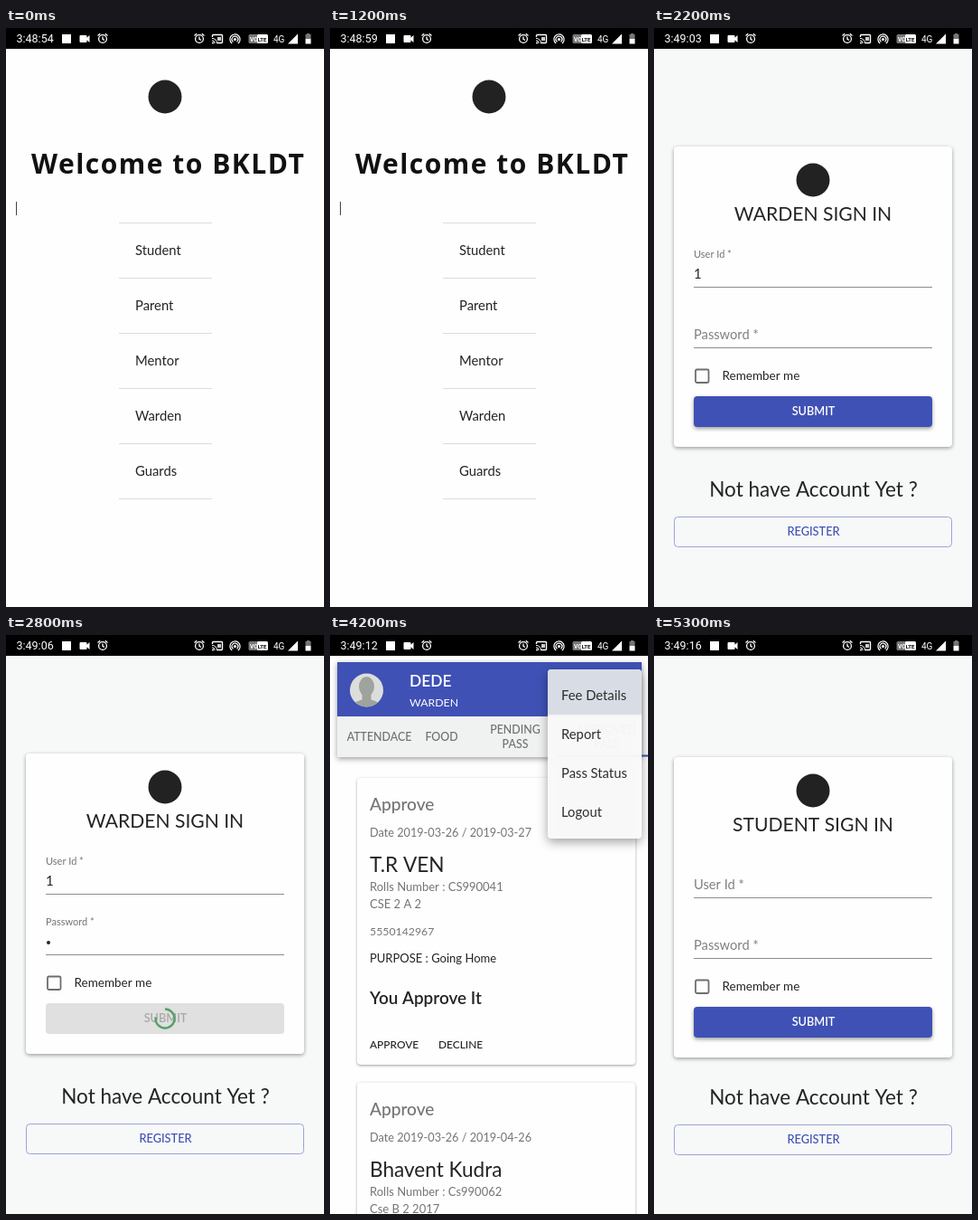
Recreate the animation shown at these times as an HTML page with a canvas. Size 352 by 640 pixels, loop 5400 ms.

```html
<!DOCTYPE html>
<html lang="en">
<head>
<meta charset="utf-8">
<title>Campus pass app</title>
<style>
html, body { margin: 0; width: 100%; height: 100%; overflow: hidden; background: #fdfdfd; }
canvas { display: block; width: 352px; height: 640px; }
</style>
</head>
<body>
<canvas id="stage" width="352" height="640"></canvas>
<script>
const ctx = document.getElementById('stage').getContext('2d');
const LOOP = 5400, STEP = 100;
const BLUE = '#3f51b5', GRAY = '#757575', INK = '#242424', PAPER = '#fdfefd';
const RED = '#bd3b33', ORANGE = '#e28423';
const PITCH = 355, REST = 184.6;

const clamp = v => Math.max(0, Math.min(1, v));
const easeOut = v => 1 - (1 - clamp(v)) ** 3;
const lerp = (a, b, p) => a + (b - a) * p;

function text(str, x, y, size, { color = INK, weight = 400, align = 'left', family = 'Lato', spacing = 0 } = {}) {
  ctx.font = `${weight} ${size}px ${family}, sans-serif`;
  ctx.letterSpacing = spacing + 'px';
  ctx.textAlign = align;
  ctx.fillStyle = color;
  ctx.fillText(str, x, y);
}

function rect(x, y, w, h, color) {
  ctx.fillStyle = color;
  ctx.fillRect(x, y, w, h);
}

function circle(x, y, r, color) {
  ctx.beginPath();
  ctx.arc(x, y, r, 0, Math.PI * 2);
  ctx.fillStyle = color;
  ctx.fill();
}

function arc(x, y, r, from, to, color, width) {
  ctx.beginPath();
  ctx.arc(x, y, r, from, to);
  ctx.strokeStyle = color;
  ctx.lineWidth = width;
  ctx.stroke();
}

function poly(color, ...points) {
  ctx.beginPath();
  points.forEach(([x, y]) => ctx.lineTo(x, y));
  ctx.closePath();
  ctx.fillStyle = color;
  ctx.fill();
}

function box(x, y, w, h, r, fill, stroke, lineWidth = 1) {
  ctx.beginPath();
  ctx.roundRect(x, y, w, h, r);
  if (fill) { ctx.fillStyle = fill; ctx.fill(); }
  if (stroke) { ctx.strokeStyle = stroke; ctx.lineWidth = lineWidth; ctx.stroke(); }
}

function raised(x, y, w, h, r, fill, blur = 4, drop = 1.5) {
  ctx.save();
  ctx.shadowColor = 'rgba(0,0,0,.38)';
  ctx.shadowBlur = blur;
  ctx.shadowOffsetY = drop;
  box(x, y, w, h, r, fill);
  ctx.restore();
}

function alarm(x) {
  arc(x, 12, 4.4, 0, Math.PI * 2, '#fff', 1.3);
  ctx.beginPath();
  ctx.moveTo(x, 9.5); ctx.lineTo(x, 12.3); ctx.lineTo(x + 2, 13.5);
  ctx.moveTo(x - 5.5, 8.5); ctx.lineTo(x - 2.8, 6.2);
  ctx.moveTo(x + 5.5, 8.5); ctx.lineTo(x + 2.8, 6.2);
  ctx.stroke();
}

function statusBar(t) {
  rect(0, 0, 352, 23, '#000');
  const secs = 54 + Math.floor(t * 0.00419 + 0.5);
  const clock = `3:${48 + Math.floor(secs / 60)}:${String(secs % 60).padStart(2, '0')}`;
  const font = { color: '#fff', family: 'Roboto' };
  text(clock, 11.5, 16.3, 12.5, font);
  rect(62, 7, 10, 10, '#fff');
  box(81.5, 8, 8, 8, 1, '#fff');
  poly('#fff', [89, 11], [92.5, 8], [92.5, 16], [89, 13]);
  alarm(107);
  alarm(214);
  // cast
  box(228.5, 7.5, 11, 9, 1, null, '#fff', 1.4);
  rect(227, 10, 6, 8, '#000');
  rect(234, 10, 4, 4, '#ccc');
  circle(229, 16.5, 1, '#fff');
  arc(228, 17, 3.2, -Math.PI / 2, 0, '#fff', 1);
  arc(228, 17, 5.6, -Math.PI / 2, 0, '#fff', 1);
  // hotspot
  circle(253.5, 12.5, 1.6, '#fff');
  for (const r of [3.4, 5.6]) arc(253.5, 12.5, r, Math.PI * 0.7, Math.PI * 2.3, '#fff', 1.2);
  box(268.5, 7, 21, 10, 1.5, '#777');
  box(278, 7, 12, 10, 1.5, '#fff');
  text('VO', 270, 14.7, 6.5, { ...font, weight: 700 });
  text('LTE', 278.7, 14.7, 6, { ...font, color: '#000', weight: 700 });
  text('4G', 296, 15.7, 10, font);
  poly('#fff', [312, 17.5], [323, 6.5], [323, 17.5]);
  rect(333, 6, 3, 2, '#777');
  rect(331.5, 7, 6, 5, '#777');
  rect(331.5, 12, 6, 5.5, '#fff');
}

function welcome() {
  rect(0, 0, 352, 640, PAPER);
  circle(176, 76, 18.5, '#222');
  text('Welcome to BKLDT', 28, 161, 30, { color: '#111', weight: 700, family: '"Noto Sans"', spacing: 1.5 });
  rect(11, 192, 1, 15, '#444');
  ['Student', 'Parent', 'Mentor', 'Warden', 'Guards'].forEach((role, i) => {
    rect(125, 215 + 61 * i, 103, 1, '#dcdcdc');
    text(role, 143, 251 + 61 * i, 14.8);
  });
  rect(125, 520, 103, 1, '#dcdcdc');
}

function field(label, y, filled) {
  if (filled) text(label, 44, y - 23, 11, { color: GRAY });
  else text(label, 44, y, 14.7, { color: '#808080' });
  rect(44, y + 9, 264, 1, '#8c8c8c');
}

function signIn(role, age, form = {}) {
  const slide = 100 * Math.exp(-age / 62);
  rect(0, 0, 352, 640, '#f7f8f8');

  ctx.save();
  ctx.translate(0, Math.round(slide));
  raised(22, 131, 308, 332, 4, PAPER);
  circle(176, 168, 18.5, '#222');
  text(role + ' SIGN IN', 176, 212.5, 21.1, { align: 'center' });
  field('User Id *', 277, form.user);
  field('Password *', 344, form.pass);
  if (form.user) text('1', 44, 277, 15);
  if (form.pass) circle(47, 340, 2, INK);
  if (form.caret) rect(44, 264, 1, 17, '#111');
  box(46, 377.5, 14.5, 14.5, 1.5, null, '#6e6e6e', 1.8);
  text('Remember me', 75.5, 389, 13.5);
  if (form.busy) box(44, 407, 264, 34, 4, '#dfe0df');
  else raised(44, 407, 264, 34, 4, BLUE, 4, 2);
  text('SUBMIT', 176.5, 428, 12.7, { color: form.busy ? '#a8a8a8' : '#fff', weight: 600, align: 'center' });
  if (form.busy) {
    const turn = form.spin * Math.PI * 2 - Math.PI / 2;
    arc(176, 424, 10.5, turn, turn + Math.PI * 1.55, '#57a06a', 2.4);
  }
  ctx.restore();

  ctx.save();
  ctx.translate(0, Math.round(slide / 4));
  text('Not have Account Yet ?', 176.5, 517.5, 22.5, { align: 'center' });
  box(22.5, 540.5, 307, 33, 4, null, '#9aa4d6');
  text('REGISTER', 176.5, 561, 12.8, { color: BLUE, weight: 500, align: 'center' });
  ctx.restore();
}

function wedge(x, y, from, to, color, label) {
  const r = 140, mid = (from + to) / 2;
  ctx.beginPath();
  ctx.moveTo(x, y);
  ctx.arc(x, y, r, from, to);
  ctx.fillStyle = color;
  ctx.fill();
  text(label, x + Math.cos(mid) * r / 2, y + Math.sin(mid) * r / 2 + 4.5, 12.5, { align: 'center' });
}

function chart(x, title, y, slices) {
  title.forEach((line, i) => text(line, x, 187 + 38 * i, 31.3, { color: GRAY, align: 'center' }));
  slices.forEach(({ from, to, color, count, label }, i) => {
    wedge(x, y, Math.PI * from, Math.PI * to, color, count);
    rect(x - 140, y + 159 + 57 * i, 41, 28, color);
    text(label, x - 84, y + 178 + 44.5 * i, 15.1);
  });
}

const ATTENDANCE = [
  { from: 0, to: 0.8, color: ORANGE, count: '10', label: 'Student Present' },
];
const FOOD = [
  { from: 0.8, to: 2, color: RED, count: '15', label: 'Student Generate Food Pass' },
  { from: 0, to: 0.8, color: ORANGE, count: '10', label: 'Student Not Generate Food' },
];

const PASSES = [
  { until: '2019-03-27', name: 'T.R VEN', roll: 'CS990041', group: 'CSE 2 A 2' },
  { until: '2019-04-26', name: 'Bhavent Kudra', roll: 'Cs990062', group: 'Cse B 2 2017' },
];

function passes(x, state) {
  PASSES.forEach((pass, i) => {
    ctx.save();
    ctx.translate(x - REST, i * 336.5);
    raised(30, 158, 308, 317, 4, PAPER, 3, 1);
    text(state, 44, 194, 19.1, { color: GRAY, weight: 500 });
    text(`Date 2019-03-26 / ${pass.until}`, 44, 223, 12.7, { color: GRAY });
    text(pass.name, 44, 262, 22.6);
    text('Rolls Number : ' + pass.roll, 44, 283, 13, { color: GRAY });
    text(pass.group, 44, 302, 13, { color: GRAY });
    text('5550142967', 44, 332, 12.3, { color: GRAY });
    text('PURPOSE : Going Home', 44, 362, 13);
    if (state === 'Approve') text('You Approve It', 44, 408, 18.9, { weight: 600 });
    text('APPROVE', 44, 457, 11.9, { weight: 500 });
    text('DECLINE', 120, 457, 11.9, { weight: 500 });
    ctx.restore();
  });
}

const TABS = [
  { lines: ['ATTENDACE'], from: 8, to: 77, mid: 54.5 },
  { lines: ['FOOD'], from: 87, to: 156, mid: 123.5 },
  { lines: ['PENDING', 'PASS'], from: 158, to: 252, mid: 205 },
  { lines: ['APPROVED', 'PASS'], from: 252, to: 360, mid: 306 },
];

function avatar(x, y) {
  ctx.save();
  ctx.beginPath();
  ctx.arc(x, y, 18.5, 0, Math.PI * 2);
  ctx.clip();
  rect(x - 20, y - 20, 40, 40, '#dcdedb');
  ctx.fillStyle = '#a0a39d';
  ctx.beginPath();
  ctx.ellipse(x, y - 4, 8.5, 11, 0, 0, Math.PI * 2);
  ctx.ellipse(x, y + 19, 16, 9, 0, 0, Math.PI * 2);
  ctx.fill();
  rect(x - 5, y, 10, 14, '#a0a39d');
  ctx.restore();
}

function header(pos) {
  raised(8, 30, 337, 105, 0, '#f0f1f1', 6, 2);
  rect(8, 30, 337, 60, BLUE);
  avatar(40.5, 61);
  text('DEDE', 88, 57, 17.4, { color: '#fff', weight: 600 });
  text('WARDEN', 88, 79, 12.3, { color: '#fff' });
  for (const y of [55.5, 62, 68.5]) circle(319, y, 1.8, '#fff');

  const active = Math.round(pos);
  TABS.forEach(({ lines, mid }, i) => lines.forEach((line, row) => {
    const y = lines.length > 1 ? 109 + 16 * row : 117;
    text(line, mid, y, 12.4, { color: i === active ? BLUE : '#707070', weight: 500, align: 'center' });
  }));
  const left = Math.floor(pos), a = TABS[left], b = TABS[Math.min(left + 1, 3)], p = pos - left;
  const from = lerp(a.from, b.from, p), to = lerp(a.to, b.to, p);
  rect(from, 132.5, to - from, 2, BLUE);
}

function menu(alpha) {
  ctx.save();
  ctx.globalAlpha = alpha;
  raised(241, 38, 104, 187, 4, '#fbfcfb', 12, 4);
  box(241, 38, 104, 50, [4, 4, 0, 0], '#d8dce4');
  ['Fee Details', 'Report', 'Pass Status', 'Logout'].forEach((item, i) => text(item, 256, 72 + 43 * i, 14.8));
  ctx.restore();
}

function dashboard(t) {
  const pos = [3550, 3800, 3950].reduce((sum, start) => sum + easeOut((t - start) / 100), 0);
  const at = i => REST + (i - pos) * PITCH;
  rect(0, 0, 352, 640, PAPER);
  ctx.save();
  ctx.beginPath();
  ctx.rect(8, 136, 344, 504);
  ctx.clip();
  chart(at(0), ['Attendance'], 352, ATTENDANCE);
  chart(at(1), ['Today Totol Number', 'Of Student For Food', 'Pass'], 423, FOOD);
  passes(at(2), 'Pending');
  passes(at(3), 'Approve');
  ctx.restore();
  header(pos);
  if (t >= 4200) menu(t < 4300 ? 0.96 : 1);
}

function wardenSignIn(t) {
  signIn('WARDEN', t - 1300, {
    caret: t >= 1600 && t < 1900,
    user: t >= 2000,
    pass: t >= 2400,
    busy: t >= 2700,
    spin: (t - 2800) / 334,
  });
}

const SCENES = [
  [600, welcome],
  [1000, t => signIn('STUDENT', t - 600)],
  [1300, welcome],
  [3100, wardenSignIn],
  [4600, dashboard],
  [5100, welcome],
  [LOOP, t => signIn('STUDENT', t - 5100)],
];

const origin = performance.now();
function frame() {
  const elapsed = (performance.now() - origin) % LOOP;
  const t = Math.floor(elapsed / STEP) * STEP;
  const [, draw] = SCENES.find(([end]) => t < end);
  draw(t);
  statusBar(t);
  requestAnimationFrame(frame);
}
frame();
</script>
</body>
</html>
```
